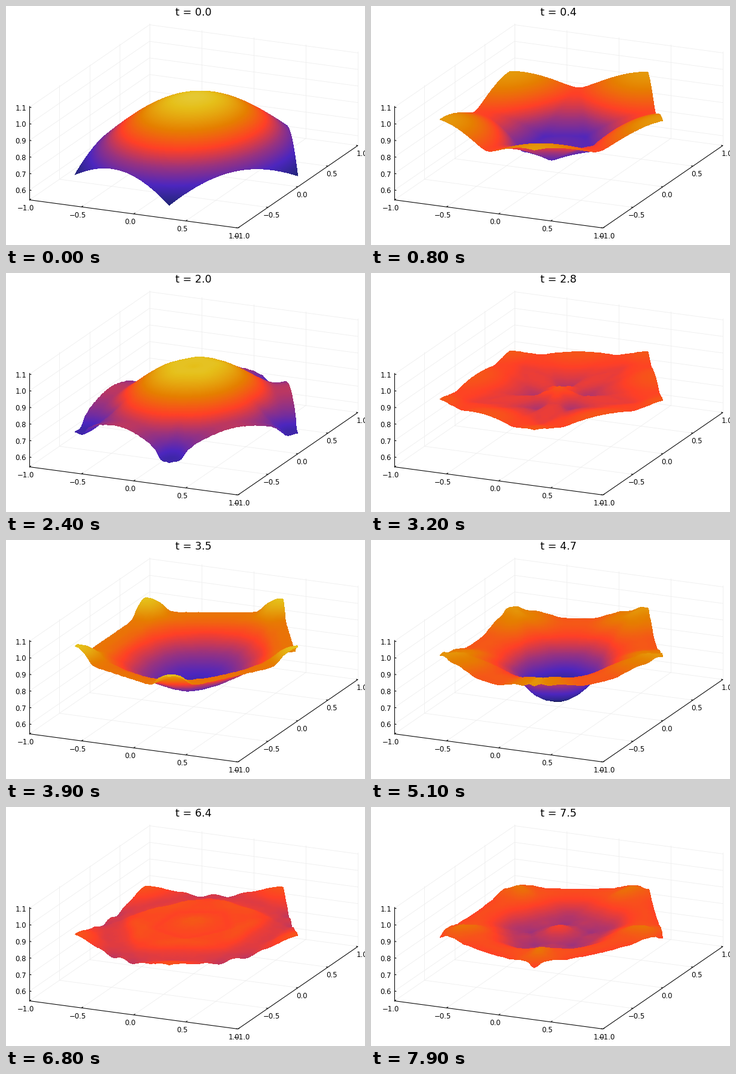
Animation, 600 px wide and 400 px high, one loop 8 s. Source, as a matplotlib script:

```python
import numpy as np
import matplotlib.pyplot as plt
from matplotlib.animation import FuncAnimation
from matplotlib.collections import LineCollection

W, H = 600, 400
FRAMES, STEP, HOLD = 80, 100, 4
SPEED = np.sqrt(2)
N, FINE = 54, 9               # wedge subdivisions, samples per subdivision
RADIUS = 0.996                # drawn size of the pentagon
Z_LOW, Z_TOP = 0.541, 1.11    # vertical axis
C_LOW, C_TOP = 0.54, 1.13     # colour range
Z_SCALE = 277.4
GREY = "#eeeeee"


def project(x, y, z=Z_LOW):
    """Parallel projection to pixel coordinates, y pointing down."""
    px = 313.7 + 174.2 * x + 100.25 * y
    py = 279.0 + 23.5 * x - 69 * y - Z_SCALE * (z - Z_LOW)
    return px, py


# --- wave equation on one fifth of a pentagon, free edges ---------------
step = 2 * np.pi / 5
A = np.array([1.0, 0.0])
B = np.array([np.cos(step), np.sin(step)])


def wedge(n):
    i, j = np.mgrid[:n + 1, :n + 1]
    keep = i + j <= n
    return i[keep], j[keep]


def modes():
    i, j = wedge(N)
    ids = np.zeros((N + 2, N + 2), int)
    ids[i, j] = np.arange(len(i))

    up, down = i + j < N, i + j < N - 1
    a, b = i[up], j[up]
    c, d = i[down], j[down]
    cells = np.vstack([
        np.stack([ids[a, b], ids[a + 1, b], ids[a, b + 1]], 1),
        np.stack([ids[c + 1, d + 1], ids[c, d + 1], ids[c + 1, d]], 1)])

    # mass halfway between lumped and consistent keeps wave fronts sharp
    area = 0.5 * np.sin(step)
    edges = np.array([B - A, -B, A])
    cell_stiff = edges @ edges.T / (4 * area)
    cell_mass = area / N ** 2 * (5 * np.eye(3) + 1) / 24
    stiff = np.zeros((len(i), len(i)))
    mass = np.zeros_like(stiff)
    for r in range(3):
        for s in range(3):
            where = cells[:, r], cells[:, s]
            np.add.at(stiff, where, cell_stiff[r, s])
            np.add.at(mass, where, cell_mass[r, s])

    inv = np.linalg.inv(np.linalg.cholesky(mass))
    lam, vec = np.linalg.eigh(inv @ stiff @ inv.T)
    shapes = inv.T @ vec
    pos = (i[:, None] * A + j[:, None] * B) / N
    start = np.exp(-(pos ** 2).sum(1) / 2)
    coef = shapes.T @ (mass @ start)
    return ids, np.sqrt(np.maximum(lam, 0)), shapes, coef


ids, omega, shapes, coef = modes()

# --- dense samples of the surface ---------------------------------------
p, q = wedge(N * FINE)
ci, cj = p // FINE, q // FINE
fx, fy = (p % FINE) / FINE, (q % FINE) / FINE
upper = fx + fy > 1
corner = np.where(upper, ids[np.minimum(ci + 1, N), np.minimum(cj + 1, N)],
                  ids[ci, cj])
near_a, near_b = ids[ci + 1, cj], ids[ci, cj + 1]
w_corner = np.abs(1 - fx - fy)
w_a = np.where(upper, 1 - fy, fx)
w_b = np.where(upper, 1 - fx, fy)

local_xy = RADIUS * (p[:, None] * A + q[:, None] * B) / (N * FINE)
turn = np.arange(5)[:, None] * step
gx = (np.cos(turn) * local_xy[:, 0] - np.sin(turn) * local_xy[:, 1]).ravel()
gy = (np.sin(turn) * local_xy[:, 0] + np.cos(turn) * local_xy[:, 1]).ravel()
order = np.argsort(100.25 * gx - 174.2 * gy)    # back to front
sample = np.tile(np.arange(len(p)), 5)[order]
base_x, base_y = project(gx[order], gy[order])
cols = np.floor(base_x + 0.4).astype(int)
cmap = plt.get_cmap("CMRmap")


def surface(t):
    u = shapes @ (np.cos(SPEED * omega * t) * coef)
    z = w_corner * u[corner] + w_a * u[near_a] + w_b * u[near_b]
    rgba = cmap((z - C_LOW) / (C_TOP - C_LOW), bytes=True)
    rows = np.floor(base_y - Z_SCALE * (z[sample] - Z_LOW)).astype(int)
    img = np.zeros((H, W, 4), np.uint8)
    img[np.clip(rows, 0, H - 1), cols] = rgba[sample]
    return img


# --- stage ----------------------------------------------------------------
fig = plt.figure(figsize=(W / 100, H / 100), dpi=100, facecolor="white")
ax = fig.add_axes([0, 0, 1, 1])
ax.axis("off")


def lines(segments, color, width, z):
    paths = [[project(*a), project(*b)] for a, b in segments]
    ax.add_collection(LineCollection(paths, colors=color, linewidths=width,
                                     zorder=z))


def label(x, y, text, align="center", size=8.4):
    return ax.text(x, y, text, ha=align, va="baseline", fontsize=size,
                   family="DejaVu Sans", color="black", zorder=4)


def number(v):
    return f"{v:.1f}".replace("-", "\u2212")


ticks = np.linspace(-1, 1, 5)
heights = np.arange(6, 12) / 10
grid, marks = [], []
for v in ticks:
    grid += [((v, -1, Z_LOW), (v, 1, Z_LOW)), ((v, 1, Z_LOW), (v, 1, Z_TOP)),
             ((-1, v, Z_LOW), (1, v, Z_LOW)), ((-1, v, Z_LOW), (-1, v, Z_TOP))]
    marks += [((v, -1, Z_LOW), (v, -0.974, Z_LOW)),
              ((1, v, Z_LOW), (0.982, v, Z_LOW))]
    x, y = project(v, -1)
    label(x - 6.4, y + 17.4, number(v))
    x, y = project(1, v)
    label(x + 6.5, y + 17.2, number(v))
for h in heights:
    grid += [((-1, -1, h), (-1, 1, h)), ((-1, 1, h), (1, 1, h))]
    marks.append(((-1, -1, h), (-0.982, -1, h)))
    label(34, project(-1, -1, h)[1] + 5.3, number(h), "right")

lines(grid, GREY, 0.6, 1)
axes = [((-1, -1, Z_LOW), (1, -1, Z_LOW)), ((1, -1, Z_LOW), (1, 1, Z_LOW)),
        ((-1, -1, Z_LOW), (-1, -1, Z_TOP))]
lines(axes + marks, "black", 0.75, 3)

picture = ax.imshow(np.zeros((H, W, 4), np.uint8), extent=(0, W, H, 0),
                    interpolation="nearest", aspect="auto", zorder=2)
ax.set_xlim(0, W)
ax.set_ylim(H, 0)
title = label(313.8, 15.5, "", size=12.6)


def draw(i):
    t = max(0, i - HOLD) / 10
    picture.set_data(surface(t))
    title.set_text(f"t = {t:.1f}")
    return picture, title


anim = FuncAnimation(fig, draw, frames=FRAMES, interval=STEP, repeat=True,
                     repeat_delay=0, blit=False)
plt.show()
```
